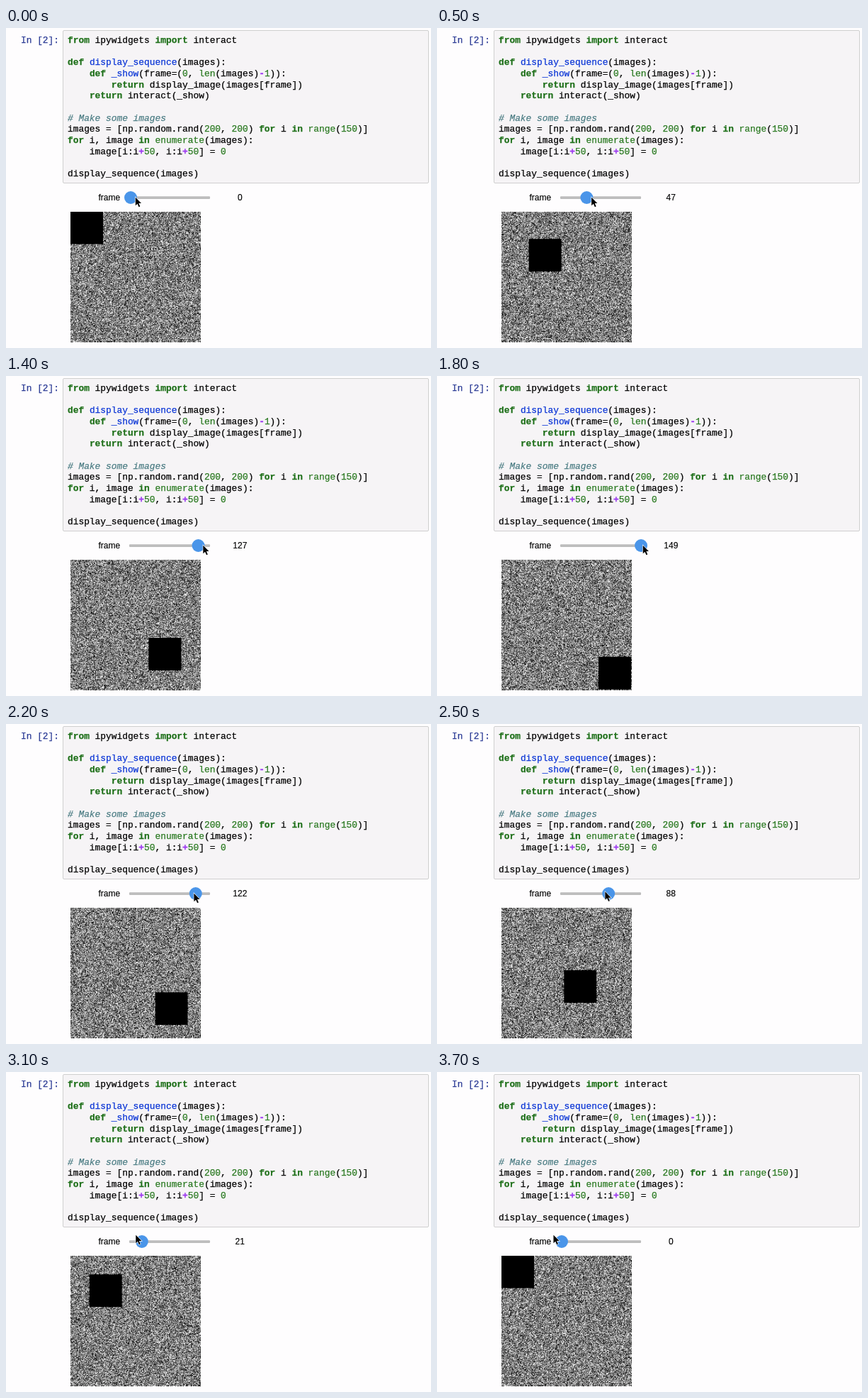
Animation, 600 px wide and 451 px high, one loop 3800 ms. Source, as an HTML page with a canvas:

```html
<!DOCTYPE html>
<html lang="en">
<head>
<meta charset="utf-8">
<title>Image sequence slider</title>
<style>
html, body { margin: 0; width: 100%; height: 100%; overflow: hidden; background: #fefdfe; }
.cell { position: absolute; left: 80px; top: 3px; width: 515px; height: 214px;
  border: 1px solid #cfcfcf; border-radius: 2px; background: #f6f4f6; }
pre { position: absolute; top: 10px; margin: 0; color: #000; -webkit-text-stroke: .25px;
  font: 12.87px/15.67px "Liberation Mono", monospace; }
.prompt { left: 21px; color: #2c3c96; }
.code { left: 87px; }
.code b { color: #1f701a; }
.code u { color: #2b7a22; text-decoration: none; }
.code em { color: #0a35d6; font-style: normal; }
.code s { color: #9a35f0; font-weight: bold; text-decoration: none; }
.code i { color: #4c7d84; }
canvas { position: absolute; left: 91px; top: 258px; }
svg { position: absolute; left: 0; top: 0; font: 12px "Liberation Sans", Arial, sans-serif; }
text { stroke: #000; stroke-width: .15px; }
</style>
</head>
<body>
<div class="cell"></div>
<pre class="prompt">In [2]:</pre>
<pre class="code"><b>from</b> ipywidgets <b>import</b> interact

<b>def</b> <em>display_sequence</em>(images):
    <b>def</b> <em>_show</em>(frame=(<u>0</u>, <u>len</u>(images)<s>-</s><u>1</u>)):
        <b>return</b> display_image(images[frame])
    <b>return</b> interact(_show)

<i># Make some images</i>
images = [np.random.rand(<u>200</u>, <u>200</u>) <b>for</b> i <b>in</b> <u>range</u>(<u>150</u>)]
<b>for</b> i, image <b>in</b> <u>enumerate</u>(images):
    image[i:i<s>+</s><u>50</u>, i:i<s>+</s><u>50</u>] = <u>0</u>

display_sequence(images)</pre>
<canvas id="view" width="184" height="185"></canvas>
<svg width="600" height="451">
  <text x="130.5" y="243">frame</text>
  <text id="value" x="330.3" y="243" text-anchor="middle">0</text>
  <rect x="174" y="237.3" width="114" height="3.7" rx="1" fill="#bdbdbd"/>
  <circle id="knob" cy="239" r="9" fill="#4a95e9"/>
  <path id="cursor" d="M0 0V11.5L2.7 9 4.7 13.6 6.5 12.8 4.6 8.4H8.2Z"
    stroke="#fff" stroke-width="1.2" paint-order="stroke"/>
</svg>
<script>
const STEP = 100, LOOP = 3800, SIZE = 200, LAST = 149, LAG = 70;
const $ = id => document.getElementById(id);
const clamp = (v, lo, hi) => Math.min(hi, Math.max(lo, v));
const ramp = (t, from, to) => clamp((t - from) / (to - from), 0, 1);
const smooth = u => u * u * (3 - 2 * u);

// Dragged right with a slight wobble, held at the end, then pulled back
function sliderAt(t) {
  const out = 0.0898 * t + 3.6 * Math.sin(2 * Math.PI * t / 1300);
  const back = 122 - 0.1117 * (t - 2200);
  return Math.round(clamp(Math.min(out, back), 0, LAST));
}

const knobX = value => 176 + value * 0.752;

// The pointer drifts left and up of the knob on the way back, then swings round
function cursorAt(t) {
  const drift = 0.41 * Math.sqrt(Math.max(0, t - 1700));
  const swing = 18 * Math.sin(Math.PI * ramp(t, 3300, 3700));
  const lift = 9 * smooth(ramp(t, 2200, 3100));
  return [knobX(sliderAt(t)) + 6.8 - drift - swing, 238.7 - lift];
}

const view = $("view").getContext("2d");
view.imageSmoothingQuality = "high";
const buffer = document.createElement("canvas");
buffer.width = buffer.height = SIZE;
const noise = buffer.getContext("2d");
const pixels = noise.createImageData(SIZE, SIZE);
const data = new Uint32Array(pixels.data.buffer);

function drawImage(index) {
  let seed = (index + 1) * 2654435761 | 0;
  for (let p = 0; p < data.length; p++) {
    seed ^= seed << 13; seed ^= seed >>> 17; seed ^= seed << 5;
    data[p] = 0xff000000 | (seed >>> 24) * 0x010101;
  }
  noise.putImageData(pixels, 0, 0);
  noise.fillRect(index, index, 50, 50);
  view.clearRect(0, 0, 184, 185);
  view.drawImage(buffer, 0, 0.6, 184, 184);
}

let shown = -1;
function tick() {
  const t = Math.floor(performance.now() % LOOP / STEP) * STEP;
  if (t !== shown) {
    shown = t;
    const value = sliderAt(t);
    $("value").textContent = value;
    $("knob").setAttribute("cx", knobX(value));
    $("cursor").setAttribute("transform", `translate(${cursorAt(t)})`);
    drawImage(sliderAt(t - LAG));
  }
  requestAnimationFrame(tick);
}
tick();
</script>
</body>
</html>
```
